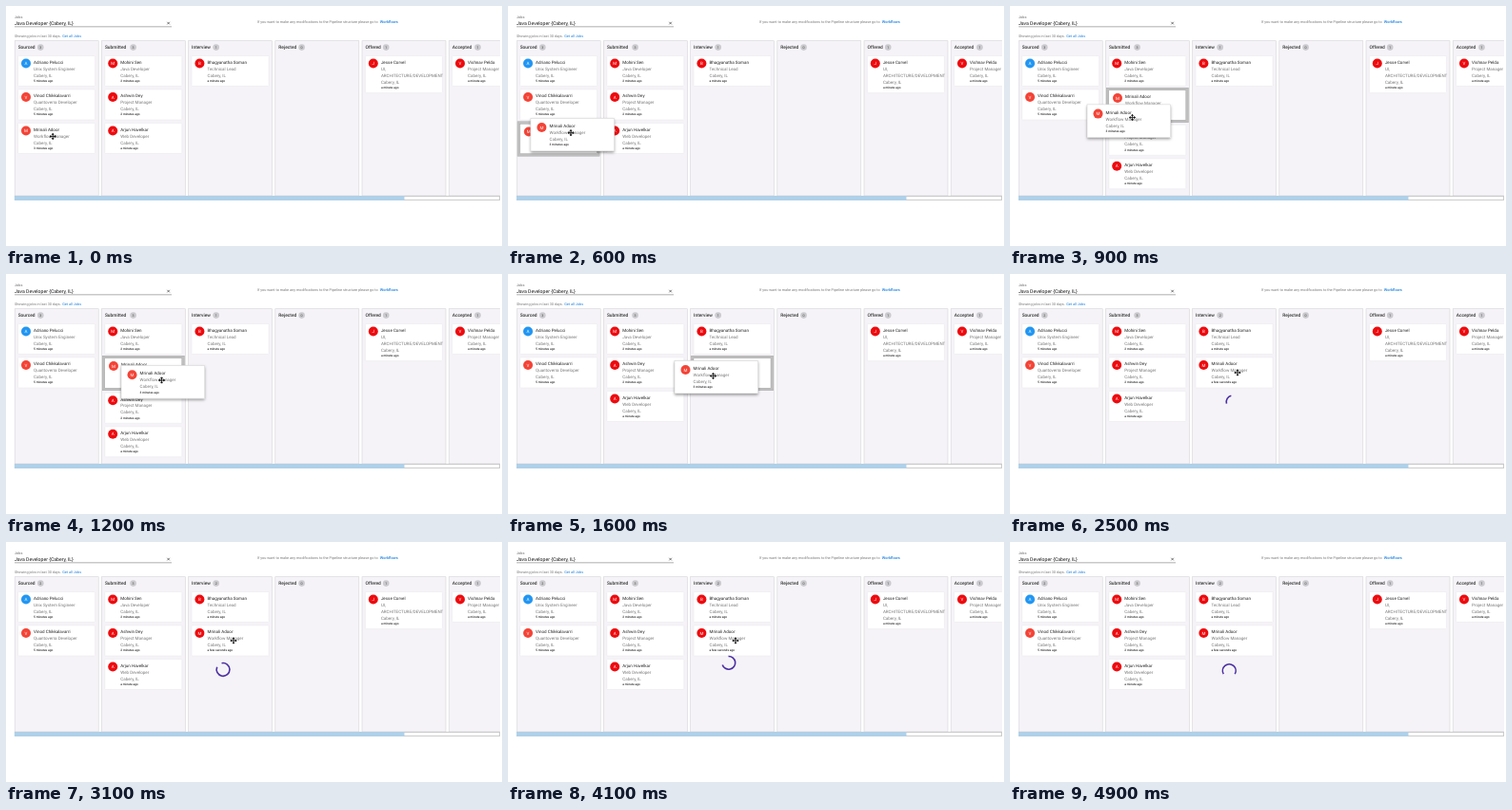
Write an HTML page that moves like this. It is 521 px wide and 253 px high and loops after 5000 ms.

```html
<!DOCTYPE html>
<html lang="en">
<head>
<meta charset="utf-8">
<title>Pipeline board</title>
<style>
html, body { margin: 0; width: 100%; height: 100%; overflow: hidden; background: #fff; }
svg { display: block; width: 521px; height: 253px; }
text { font-family: Roboto, Arial, sans-serif; text-rendering: geometricPrecision; }
</style>
</head>
<body>
<svg id="stage" viewBox="0 0 521 253">
  <defs>
    <filter id="shadow" x="-20%" y="-40%" width="140%" height="190%">
      <feDropShadow dx="0" dy="1.6" stdDeviation="1.6" flood-color="#000" flood-opacity=".42"/>
    </filter>
    <clipPath id="board"><rect x="0" y="30" width="519" height="180"/></clipPath>
  </defs>
  <g id="page"></g>
  <g id="cards" clip-path="url(#board)"></g>
  <g id="drag"></g>
</svg>
<script>
const LOOP = 5000, STEP = 100;
const PITCH = 91.2, COL_X = 9.2, COL_W = 88, CARD_Y = 52.5, CARD_GAP = 35.5;
const DROP = 2300, SAVED = 2500, CURSOR_OFF = 4500;
const BLUE = '#2196f3', CORAL = '#f44336', RED = '#ee0a0e';
const $ = id => document.getElementById(id);

const person = (name, job, ago, color) => ({ name, job: [].concat(job), ago, color });
const moved = person('Mrinali Adoor', 'Workflow Manager', '3 minutes ago', CORAL);
const savedCard = { ...moved, ago: 'a few seconds ago', color: RED };

const columns = [
  ['Sourced', 36.3, [
    person('Adriano Pelucci', 'Unix System Engineer', '5 minutes ago', BLUE),
    person('Vinod Chikkalavarri', 'Quantoverra Developer', '5 minutes ago', CORAL)]],
  ['Submitted', 133.6, [
    person('Mohini Sen', 'Java Developer', '2 minutes ago', RED),
    person('Ashwin Dey', 'Project Manager', '2 minutes ago', RED),
    person('Arjun Havelkar', 'Web Developer', 'a minute ago', RED)]],
  ['Interview', 220.7, [
    person('Bhagyanatha Soman', 'Technical Lead', 'a minute ago', RED)]],
  ['Rejected', 310.6, []],
  ['Offered', 399.2, [
    person('Jesse Corvel', ['UI,', 'ARCHITECTURE/DEVELOPMENT'], 'a minute ago', RED)]],
  ['Accepted', 495.5, [
    person('Vishnav Pelda', 'Project Manager', 'a minute ago', RED)]]
];

// time, cursor x, cursor y, dragged card x, dragged card y
const path = [
  [500, 50, 137.3, 9.8, 121.6],
  [700, 82, 130, 38, 115],
  [900, 128.5, 117.5, 81, 103.9],
  [1100, 151, 113.5, 108, 98.5],
  [1300, 176, 110.5, 134, 94.5],
  [1600, 215.5, 107.5, 175, 91.3],
  [1800, 228, 106.2, 187, 90.8],
  [2100, 237.5, 105, 196.3, 90.3],
  [2300, 239, 104, 197.8, 89.8]
];
// time, orbit angle, gap angle, arc sweep
const spin = [
  [2500, 49, 30, 90],
  [3100, 139, 230, 305],
  [4100, 277, 575, 255],
  [4200, 277, 575, 255],
  [4900, 464, 810, 240]
];

function sample(keys, t) {
  if (t <= keys[0][0]) return keys[0].slice(1);
  for (let i = 1; i < keys.length; i++) {
    const a = keys[i - 1], b = keys[i];
    if (t <= b[0]) {
      const k = (t - a[0]) / (b[0] - a[0]);
      return a.slice(1).map((v, j) => v + (b[j + 1] - v) * k);
    }
  }
  return keys[keys.length - 1].slice(1);
}

const text = (x, y, size, fill, str, extra = '') =>
  `<text x="${x}" y="${y}" font-size="${size}" fill="${fill}" ${extra}>${str}</text>`;
const rect = (x, y, w, h, extra) =>
  `<rect x="${x}" y="${y}" width="${w}" height="${h}" ${extra}/>`;
const MID = 'text-anchor="middle"', BOLD = 'font-weight="500"';

// Avatar and lines, relative to the avatar centre
function details(x, y, p) {
  let out = `<circle cx="${x}" cy="${y}" r="5" fill="${p.color}"/>` +
    text(x, y + 1.6, 4.5, '#fff', p.name[0], MID);
  const left = x + 8.1;
  let base = y + .2;
  out += text(left, base, 4.5, '#222', p.name);
  for (const line of [...p.job, 'Cabery, IL']) out += text(left, base += 6.95, 4.5, '#777', line);
  return out + text(left, base + 5.3, 3.2, '#222', p.ago, BOLD);
}

function card(x, y, p) {
  const h = 32 + (p.job.length - 1) * 6.95;
  return rect(x, y, 81, h, 'rx=".6" fill="#fff" stroke="#e9e7ea" stroke-width=".5"') +
    details(x + 8.4, y + 8, p);
}

function placeholder(x, y) {
  return rect(x - 2.8, y - 2, 86.6, 37, 'fill="#aaa"') +
    rect(x - 2.5, y - 1.7, 86, 36.4, 'fill="#bfbfbf"') +
    rect(x, y + .8, 81, 31.4, 'fill="#fff" stroke="#999" stroke-width=".4"') +
    details(x + 9.2, y + 9, moved);
}

function drawPage() {
  let out = text(9, 13.2, 3.8, '#666', 'Jobs') +
    text(9, 20.3, 5.15, '#111', 'Java Developer {Cabery, IL}') +
    rect(9, 21.6, 165, .6, 'fill="#777"') +
    '<path d="M169.3 16.8l2.6 2.6m0-2.6l-2.6 2.6" stroke="#222" stroke-width=".6"/>' +
    text(264, 18, 3.8, '#777',
      'If you want to make any modifications to the Pipeline structure please go to') +
    text(392.8, 18, 4, '#1a7fe0', 'Workflows', BOLD) +
    text(9, 33, 3.8, '#777', 'Showing jobs in last 30 days.') +
    text(59.2, 33, 3.8, '#1a7fe0', 'Get all Jobs');
  let cols = '';
  columns.forEach(([title, badge], i) => {
    const x = COL_X + i * PITCH;
    cols += rect(x, 36.7, COL_W, 163.3, 'fill="#f5f3f7" stroke="#d6d4d8" stroke-width=".6"') +
      text(x + 3.5, 45.1, 4.85, '#333', title, BOLD) +
      `<circle cx="${badge}" cy="43.6" r="3.3" fill="#cbcace"/>`;
  });
  out += `<g clip-path="url(#board)">${cols}</g>` +
    rect(9.2, 200.4, 509.4, 4.3, 'fill="#fff" stroke="#aaa" stroke-width=".6"') +
    rect(9, 200.1, 409.5, 4.9, 'fill="#afd0e8"');
  $('page').innerHTML = out;
}

function cursor(x, y) {
  const arm = '<path d="M0 0V-2.4M-.9-2.1L0-3.2L.9-2.1Z"/>';
  const arms = [0, 90, 180, 270].map(a => `<g transform="rotate(${a})">${arm}</g>`).join('');
  return `<g transform="translate(${x} ${y})" fill="#111" stroke="#111" stroke-width=".8">${arms}</g>`;
}

function spinner(t) {
  const [orbit, gap, sweep] = sample(spin, t);
  const rad = Math.PI / 180, r = 6.9;
  const cx = 231.3 + 4.3 * Math.cos(orbit * rad), cy = 131.6 + 4.3 * Math.sin(orbit * rad);
  const point = a => `${cx + r * Math.cos(a * rad)} ${cy + r * Math.sin(a * rad)}`;
  const start = gap + (360 - sweep) / 2;
  return `<path d="M${point(start)}A${r} ${r} 0 ${sweep > 180 ? 1 : 0} 1 ${point(start + sweep)}"
    fill="none" stroke="#4a2ea3" stroke-width="1.6"/>`;
}

function render(t) {
  const dragging = t >= 500 && t < DROP;
  const [cx, cy, dx, dy] = sample(path, t);
  const over = cx < 96 ? 0 : cx < 186 ? 1 : 2;
  const slot = over === 0 ? 2 : 1;
  const extra = [1, 0, 0, 0, 0, 0];
  if (t >= SAVED) { extra[0] = 0; extra[2] = 1; }

  let out = '';
  columns.forEach(([, badge, people], i) => {
    const x = COL_X + 3.4 + i * PITCH;
    const list = people.slice();
    if (t < 500 && i === 0) list.push(moved);
    if (t >= DROP && i === 2) list.push(t >= SAVED ? savedCard : moved);
    if (dragging && i === over) list.splice(slot, 0, null);
    let y = CARD_Y;
    for (const p of list) {
      out += p ? card(x, y, p) : placeholder(x, y);
      y += p ? CARD_GAP : 37.3;
    }
    out += text(badge, 44.9, 3.6, '#444', people.length + extra[i], MID);
  });
  $('cards').innerHTML = out;

  let top = '';
  if (dragging) {
    top += rect(dx, dy, 87.6, 34.6, 'fill="#fff" filter="url(#shadow)"') +
      rect(dx, dy, 87.6, 34.6, 'fill="#fff" stroke="#ccc" stroke-width=".5"') +
      details(dx + 11.5, dy + 9.7, moved);
  }
  if (t >= SAVED) top += spinner(t);
  if (t < CURSOR_OFF) top += t < 500 ? cursor(49.2, 137.5) : cursor(cx, cy);
  $('drag').innerHTML = top;
}

let last = -1;
function tick() {
  const step = Math.floor(performance.now() % LOOP / STEP);
  if (step !== last) render((last = step) * STEP);
  requestAnimationFrame(tick);
}
drawPage();
tick();
</script>
</body>
</html>
```
